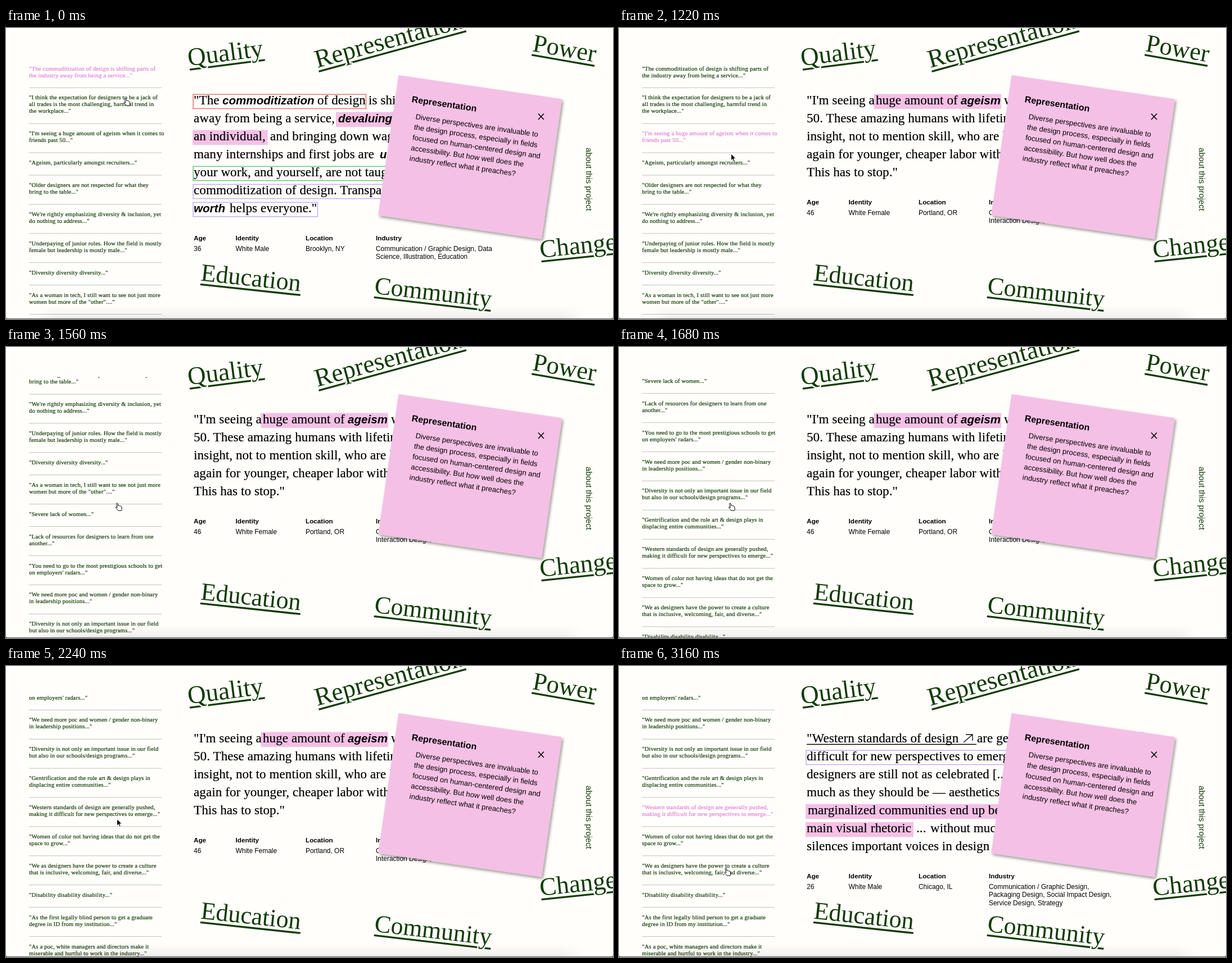
An HTML page that plays this animation: 1080 by 518 pixels, repeating every 3480 ms.

```html
<!DOCTYPE html>
<html lang="en">
<head>
<meta charset="utf-8">
<title>Design quotes</title>
<style>
html, body { margin: 0; width: 100%; height: 100%; overflow: hidden; background: #fffefb; }
svg { display: block; width: 100vw; height: 100vh; }
text { white-space: pre; }
.serif { font-family: "Liberation Serif", serif; }
.sans { font-family: "Liberation Sans", sans-serif; }
.quote { font-size: 23px; letter-spacing: .1px; stroke: #000; stroke-width: .2px; }
.strong { font: italic bold 20.6px "Liberation Sans", sans-serif; letter-spacing: 0; }
.meta { font-size: 11.95px; }
.label { font-size: 11.7px; font-weight: bold; }
.item { font-size: 10.6px; letter-spacing: .17px; stroke-width: .22px; fill: #123c08; stroke: #123c08; }
.item.on { fill: #df7fd3; stroke: #df7fd3; }
.halo { stroke: #fffefb; stroke-width: 5px; stroke-linejoin: round; }
</style>
</head>
<body>
<svg id="stage" viewBox="0 0 1080 518" preserveAspectRatio="none"></svg>
<script>
const LOOP = 3480, GREEN = '#123c08', PINK = '#f5c0e5';
const BOX = { red: '#ee7b78', green: '#72c58a', violet: '#c5b1f2' };

// Sidebar entries, lines split by "|"
const entries = [
  '"The commoditization of design is shifting parts of|the industry away from being a service..."',
  '"I think the expectation for designers to be a jack of|all trades is the most challenging, harmful trend in|the workplace..."',
  '"I\'m seeing a huge amount of ageism when it comes to|friends past 50..."',
  '"Ageism, particularly amongst recruiters..."',
  '"Older designers are not respected for what they|bring to the table..."',
  '"We\'re rightly emphasizing diversity & inclusion, yet|do nothing to address..."',
  '"Underpaying of junior roles. How the field is mostly|female but leadership is mostly male..."',
  '"Diversity diversity diversity..."',
  '"As a woman in tech, I still want to see not just more|women but more of the "other"...."',
  '"Severe lack of women..."',
  '"Lack of resources for designers to learn from one|another..."',
  '"You need to go to the most prestigious schools to get|on employers\' radars..."',
  '"We need more poc and women / gender non-binary|in leadership positions..."',
  '"Diversity is not only an important issue in our field|but also in our schools/design programs..."',
  '"Gentrification and the role art & design plays in|displacing entire communities..."',
  '"Western standards of design are generally pushed,|making it difficult for new perspectives to emerge..."',
  '"Women of color not having ideas that do not get the|space to grow..."',
  '"We as designers have the power to create a culture|that is inclusive, welcoming, fair, and diverse..."',
  '"Disability disability disability..."',
  '"As the first legally blind person to get a graduate|degree in ID from my institution..."',
  '"As a poc, white managers and directors make it|miserable and hurtful to work in the industry..."'
].map(s => s.split('|'));

// Line runs: "x text", "*" marks emphasis. Boxes: [line, left, right, kind]
const quotes = [
  { entry: 0, from: 0,
    lines: ['334 "The|385 *commoditization|554 of design|645 is shifting parts of the industry',
      '334 away from being a service,|591 *devaluing|690 you as',
      '334 an individual,|470 and bringing down wages. So',
      '334 many internships and first jobs are|665 *unpaid',
      '334 your work, and yourself, are not taught. The',
      '334 commoditization of design. Transparency in',
      '334 *worth|398 helps everyone."'],
    boxes: [[0, 333, 640.5, 'red'], [1, 587, 900], [2, 332, 465.5], [4, 333, 900, 'green'],
      [5, 333, 900, 'violet'], [6, 333, 554.5, 'violet']],
    facts: ['36', 'White Male', 'Brooklyn, NY', 'Communication / Graphic Design, Data|Science, Illustration, Education'] },
  { entry: 1, from: 180,
    lines: ['334 "I think the|446 *expectation|569 for designers to be a jack of all',
      '334 the most challenging, harmful trend in the',
      '334 example, expecting a designer to be not only',
      '334 videographer/social media manager/animator',
      '334 hiring specialists in design roles?"'],
    boxes: [[0, 442, 900]],
    facts: ['27', 'White Female', 'Erie, PA', 'Communication / Graphic Design,|Illustration, UI Design'] },
  { entry: 2, from: 900,
    lines: ['334 "I\'m seeing a|457 huge amount of|608 *ageism|685 when it comes to',
      '334 50. These amazing humans with lifetimes of',
      '334 insight, not to mention skill, who are let go',
      '334 again for younger, cheaper labor without',
      '334 This has to stop."'],
    boxes: [[0, 453.5, 680]],
    facts: ['46', 'White Female', 'Portland, OR', 'Communication / Graphic Design,|Interaction Design,'] },
  { entry: 15, from: 2560,
    lines: ['334 "Western standards of design|637 are generally pushed, making',
      '334 difficult for new perspectives to emerge',
      '334 designers are still not as celebrated [...] as',
      '334 much as they should be — aesthetics of',
      '336 marginalized communities end up being the',
      '334 main visual rhetoric|529 ...|554 without much credit',
      '334 silences important voices in design'],
    boxes: [[0, 840, 933, 'violet'], [1, 333, 900, 'violet'], [4, 332, 900], [5, 332, 524]],
    extra: '<path d="M334 139.5H636M613 136L629 122M617 122H629V133" fill="none" stroke="#000" stroke-width="1.3"/>',
    facts: ['26', 'White Male', 'Chicago, IL', 'Communication / Graphic Design,|Packaging Design, Social Impact Design,|Service Design, Strategy'] }
];

const esc = s => s.replace(/&/g, '&amp;').replace(/</g, '&lt;');
const text = (x, y, s, cls, more = '') => `<text x="${x}" y="${y}" class="${cls}" ${more}>${esc(s)}</text>`;

// Rotated keyword; the halo opens the underline around descenders
function keyword(s, x, y, angle, size, length) {
  const word = cls => text(0, 0, s, 'serif ' + cls, `font-size="${size}"`);
  return `<g transform="translate(${x} ${y}) rotate(${angle})" fill="${GREEN}">
    <rect x="1" y="5.2" width="${length}" height="3.3"/>${word('halo')}${word('')}</g>`;
}

function box([line, left, right, kind]) {
  const y = 117.5 + line * 32.05;
  return kind
    ? `<rect x="${left}" y="${y + .7}" width="${right - left}" height="25.2" fill="none" stroke="${BOX[kind]}" stroke-width="1.6"/>`
    : `<rect x="${left}" y="${y}" width="${right - left}" height="26.6" fill="${PINK}"/>`;
}

function quoteMarkup(q) {
  const runs = q.lines.map((line, i) => line.split('|').map(run => {
    const [, x, star, s] = run.match(/^(\d+) (\*?)(.*)/);
    return text(x, 136 + i * 32.05, s, star ? 'strong' : 'serif quote');
  }).join('')).join('');
  const y = 378 - (7 - q.lines.length) * 32.05;
  const facts = ['Age', 'Identity', 'Location', 'Industry'].map((label, i) => {
    const x = [334, 408.5, 533, 658][i];
    return text(x, y, label, 'sans label') + q.facts[i].split('|').map((s, n) =>
      text(x, y + 19 + n * 14.4, s, 'sans meta')).join('');
  }).join('');
  return `<g class="answer">${q.boxes.map(box).join('')}${runs}${q.extra || ''}${facts}</g>`;
}

let rowY = 72;
const spans = [];
const listMarkup = entries.map(lines => {
  const y = rowY, last = y + (lines.length - 1) * 12;
  spans.push([y - 6, last + 6]);
  rowY += 28 + lines.length * 11.95;
  return `<g class="item">${lines.map((s, i) => text(41, y + 3.5 + i * 12, s, 'serif')).join('')}</g>
    <rect x="41" y="${last + 21.8}" width="236" height="1" fill="#bfc3ba"/>`;
}).join('');

const note = `<g transform="translate(698.5 84) rotate(8.3)">
  <rect width="293.6" height="251.7" fill="${PINK}" filter="url(#shadow)"/>
  ${text(29.5, 44.2, 'Representation', 'sans', 'font-size="16" font-weight="bold"')}
  ${['Diverse perspectives are invaluable to', 'the design process, especially in fields',
    'focused on human-centered design and', 'accessibility. But how well does the',
    'industry reflect what it preaches?'].map((s, i) => text(40.6, 73 + i * 18.7, s, 'sans', 'font-size="13.05"')).join('')}
  </g><path d="M947 152.5L957 163M957 152.5L947 163" stroke="#000" stroke-width="1.6"/>`;

const stage = document.getElementById('stage');
stage.innerHTML = `<defs>
  <clipPath id="pane"><rect x="30" y="53" width="260" height="465"/></clipPath>
  <filter id="shadow" x="-10%" y="-10%" width="120%" height="120%">
    <feDropShadow dx="3" dy="3" stdDeviation="2.5" flood-color="#000" flood-opacity=".4"/></filter>
  <linearGradient id="fade" x2="0" y2="1"><stop stop-opacity="0"/><stop offset="1" stop-opacity=".06"/></linearGradient>
  <filter id="soft"><feGaussianBlur stdDeviation="14 0"/></filter></defs>
  <rect width="1080" height="518" fill="#fffefb"/>
  ${keyword('Quality', 325, 67.5, -7.4, 45, 135)}
  ${keyword('Representation', 553.8, 71, -15.3, 45.4, 272)}
  ${keyword('Power', 935.5, 41, 9.9, 44.5, 113.5)}
  ${keyword('Change', 951, 409, -6, 45, 140)}
  ${keyword('Education', 345.5, 449.5, 6.1, 44.1, 179)}
  ${keyword('Community', 654.5, 472.5, 6.6, 43.8, 209)}
  ${text(0, 0, 'about this project', 'sans', `font-size="14.8" fill="${GREEN}" transform="translate(1031.5 213) rotate(90)"`)}
  <g clip-path="url(#pane)"><g id="list">${listMarkup}</g></g>
  ${quotes.map(quoteMarkup).join('')}
  ${note}
  <rect x="70" y="495" width="940" height="22" fill="url(#fade)" filter="url(#soft)"/>
  <path d="M0 517.3H1080" stroke="#777" stroke-width="1.2"/>
  <path d="M0 514V518H4Q0 518 0 514M1080 514V518H1076Q1080 518 1080 514" fill="#333"/>
  <path id="arrow" d="M0 0V11.8L2.7 9.3 4.6 13.5 6.5 12.6 4.6 8.5H8.3Z" stroke="#fff" stroke-width=".8"/>
  <path id="hand" d="M-.9 .8c0-1.2 1.7-1.5 2.1-.2L2.3 4.6c.6-.7 1.7-.5 2 .3.7-.6 1.7-.3 1.9.5.8-.4 1.6 0 1.8.8L8.6 9c.2 1.6-.2 2.6-.9 4.2H2.4C1.3 11.4-.5 10-2 8.4c-.8-1 .4-2.1 1.4-1.4L.7 8Z"
    fill="#fff" stroke="#000" stroke-width="1"/>`;

const $ = id => document.getElementById(id);
const answers = [...stage.querySelectorAll('.answer')], items = [...stage.querySelectorAll('.item')];

// Pointer stops: [ms, x, y]
const stops = [[0, 212, 125], [180, 212, 126], [500, 206, 162], [820, 204, 193], [940, 204, 194],
  [1220, 199.5, 224], [1350, 197.5, 278], [2140, 197.5, 278], [2240, 197.5, 272.5],
  [2460, 196, 258], [2620, 196, 258], [3160, 190, 360], [LOOP, 190, 360]];

function pointer(t) {
  const i = stops.findIndex(p => p[0] > t), [t0, x0, y0] = stops[i - 1], [t1, x1, y1] = stops[i];
  const u = (t - t0) / (t1 - t0), k = u * u * (3 - 2 * u);
  return [x0 + (x1 - x0) * k, y0 + (y1 - y0) * k];
}

function scrollAt(t) {
  if (t < 1360) return 0;
  if (t < 1560) return 228 * ((t - 1360) / 200) ** 1.6;
  if (t < 1680) return 228 + 237 * (t - 1560) / 120;
  return 575 - 110 * Math.exp((1680 - t) / 60);
}

function draw(t) {
  const scroll = scrollAt(t), [x, y] = pointer(t);
  const active = quotes.filter(q => q.from <= t).pop();
  $('list').setAttribute('transform', `translate(0 ${-scroll})`);
  answers.forEach((g, i) => g.style.display = quotes[i] === active ? '' : 'none');
  items.forEach((g, i) => g.classList.toggle('on', i === active.entry));
  // The hand stays while the list scrolls beneath it
  const hand = (t > 1350 && t < 2140) || spans.some(([a, b]) => y + scroll > a && y + scroll < b);
  for (const id of ['arrow', 'hand']) {
    $(id).setAttribute('transform', `translate(${x} ${y})`);
    $(id).style.display = (id === 'hand') === hand ? '' : 'none';
  }
}

const start = performance.now();
function tick() {
  draw(Math.max(0, performance.now() - start) % LOOP);
  requestAnimationFrame(tick);
}
tick();
</script>
</body>
</html>
```
